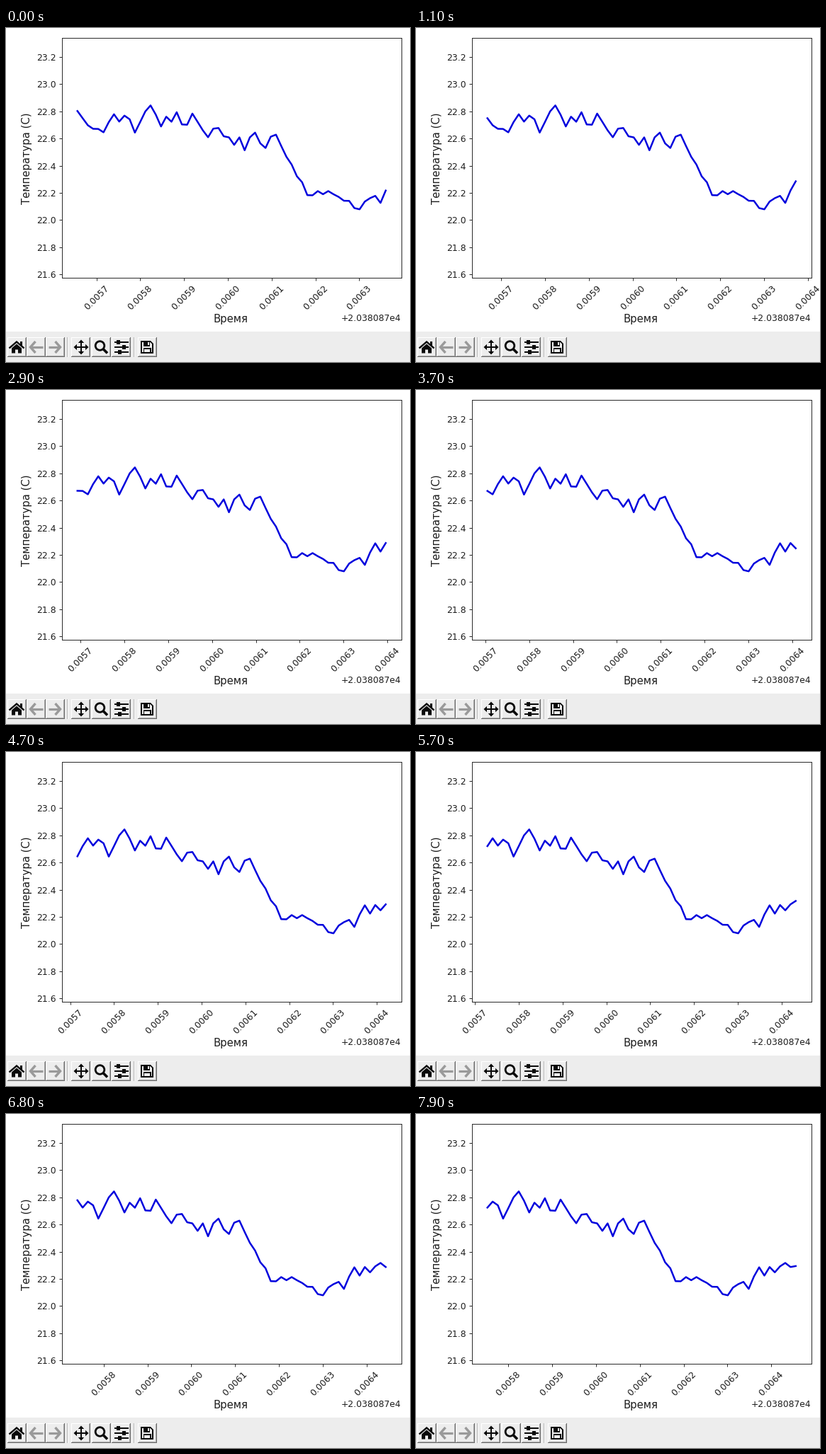
Animation, 570 px wide and 472 px high, one loop 8 s. Source, as a matplotlib script:

```python
import matplotlib.pyplot as plt
from matplotlib.animation import FuncAnimation
from matplotlib.patches import Circle, Polygon, Rectangle
from matplotlib.ticker import FuncFormatter, MultipleLocator

W, H, DPI = 570, 472, 100
PX = 72 / DPI          # one pixel in points
K = 570 / 640          # window scale
INK, EDGE, BLUE = "#1c1c1c", "#2a2a2a", "#0000dd"
ICON, DISABLED = "#0a0a0a", "#9a9a9a"

INTERVAL, FRAMES = 100, 80
ARRIVALS = (500, 1600, 2600, 3700, 4700, 5700, 6800, 7800)
WINDOW = 60                    # readings shown at once
START, STEP = 56.567, 0.1193   # time axis in units of 1e-4

# thousandths of a degree above 22
READINGS = [
    802, 749, 697, 671, 670, 645, 720, 778, 724, 768, 741, 643, 720, 799,
    843, 775, 688, 760, 723, 793, 703, 701, 783, 722, 660, 609, 672, 677,
    616, 608, 553, 608, 513, 608, 643, 564, 530, 613, 628, 545, 465, 408,
    322, 278, 183, 182, 213, 190, 213, 190, 170, 142, 141, 88, 79, 136,
    161, 178, 126, 217, 285, 224, 287, 248, 292, 317, 287, 294,
]
TEMPS = [22 + r / 1000 for r in READINGS]
TIMES = [START + STEP * i for i in range(len(TEMPS))]

plt.rcParams["font.family"] = "DejaVu Sans"
fig = plt.figure(figsize=(W / DPI, H / DPI), dpi=DPI, facecolor="white")

# Pixel-sized layer for the labels and the toolbar
ui = fig.add_axes([0, 0, 1, 1], zorder=-1)
ui.set(xlim=(0, W), ylim=(H, 0))
ui.axis("off")


def label(x, y, text, size, **kw):
    ui.text(x, y, text, fontsize=size * K, color=INK, va="baseline", **kw)


def stroke(points, color=ICON, width=1.0, join="miter"):
    xs, ys = zip(*points)
    ui.plot(xs, ys, color=color, lw=width * PX, solid_capstyle="butt",
            solid_joinstyle=join)


def fill(points, color=ICON):
    ui.add_patch(Polygon(points, closed=True, fc=color, ec="none"))


def box(x, y, w, h, color):
    ui.add_patch(Rectangle((x, y), w, h, fc=color, ec="none"))


def button(x, w=27, y=437, h=28):
    box(x, y, w, h, "#6c6c6c")
    box(x, y, w - 1, h - 1, "#ffffff")
    box(x + 1, y + 1, w - 2, h - 2, "#a8a8a8")
    box(x + 1, y + 1, w - 3, h - 3, "#ededed")


def home_icon(x, y):
    stroke([(x - 10.5, y + 1.5), (x, y - 7.5), (x + 10.5, y + 1.5)], width=2.4)
    box(x + 4.5, y - 8, 3, 6, ICON)
    fill([(x - 7, y + 1.5), (x, y - 4.5), (x + 7, y + 1.5), (x + 7, y + 8.5),
          (x + 2, y + 8.5), (x + 2, y + 3.5), (x - 2, y + 3.5),
          (x - 2, y + 8.5), (x - 7, y + 8.5)])


def arrow_icon(x, y, side):
    stroke([(x + side, y - 8), (x + 8 * side, y), (x + side, y + 8)],
           DISABLED, 3.4)
    stroke([(x + 7 * side, y), (x - 9 * side, y)], DISABLED, 3.2)


def pan_icon(x, y):
    box(x - 7, y - 1.3, 14, 2.6, ICON)
    box(x - 1.3, y - 7, 2.6, 14, ICON)
    for dx, dy in ((1, 0), (-1, 0), (0, 1), (0, -1)):
        fill([(x + 10.5 * dx, y + 10.5 * dy),
              (x + 6 * dx + 4.2 * dy, y + 6 * dy + 4.2 * dx),
              (x + 6 * dx - 4.2 * dy, y + 6 * dy - 4.2 * dx)])


def zoom_icon(x, y):
    ui.add_patch(Circle((x - 1.5, y - 2), 6.3, fc="none", ec=ICON,
                        lw=2.8 * PX))
    stroke([(x + 3, y + 2.5), (x + 9, y + 8.5)], width=3.6)


def sliders_icon(x, y):
    for dy, knob in ((-7, -3.8), (0, 4.2), (7, -2.2)):
        box(x - 10, y + dy - 0.9, 20, 1.8, ICON)
        box(x + knob - 2.6, y + dy - 2.6, 5.2, 5.2, ICON)


def save_icon(x, y):
    fill([(x - 9, y - 9), (x + 5, y - 9), (x + 9, y - 5), (x + 9, y + 9),
          (x - 9, y + 9)])
    fill([(x - 7, y - 7), (x + 4.5, y - 7), (x + 7, y - 4.5), (x + 7, y + 7),
          (x - 7, y + 7)], "#ededed")
    box(x - 5, y - 8, 9, 6.5, ICON)
    box(x + 0.6, y - 6.8, 2, 4, "#ededed")
    box(x - 5.5, y + 1, 11, 7, ICON)
    box(x - 3.8, y + 2.6, 7.6, 4.6, "#ededed")


def toolbar():
    box(0, 429, W, H - 429, "#ededed")
    for x in (2, 29, 56, 92, 121, 149, 186):
        button(x)
    for x in (86, 180):
        box(x, 437, 1, 28, "#b4b4b4")
        box(x + 1, 437, 1, 28, "#fafafa")
    home_icon(15, 451)
    arrow_icon(42.5, 451, -1)
    arrow_icon(68.5, 451, 1)
    pan_icon(106, 451)
    zoom_icon(134, 451)
    sliders_icon(162.5, 451)
    save_icon(199, 451)


def chart():
    left, right, top, bottom = 79, 557.5, 13.5, 352.5
    ax = fig.add_axes([left / W, 1 - bottom / H,
                       (right - left) / W, (bottom - top) / H])
    ax.set_ylim(21.578, 23.342)
    ax.yaxis.set_major_locator(MultipleLocator(0.2))
    ax.yaxis.set_major_formatter(FuncFormatter(lambda v, _: f"{v:.1f}"))
    ax.xaxis.set_major_locator(MultipleLocator(1))
    ax.xaxis.set_major_formatter(FuncFormatter(lambda v, _: f"{v / 1e4:.4f}"))
    ax.tick_params(labelsize=10 * K, length=3.5 * K, width=0.8 * K,
                   pad=3.5 * K, color=EDGE, labelcolor=INK)
    ax.tick_params(axis="x", rotation=45)
    for spine in ax.spines.values():
        spine.set(linewidth=0.8 * K, edgecolor=EDGE)
    return ax


toolbar()
label(317.5, 416, "Время", 12, ha="center")
label(557.5, 414, "+2.038087e4", 10, ha="right")
label(34, 184, "Температура (C)", 12, ha="center", rotation=90,
      rotation_mode="anchor")
ax = chart()
line, = ax.plot([], [], color=BLUE, lw=2 * K)


def update(frame):
    first = sum(frame * INTERVAL >= t for t in ARRIVALS)
    shown = slice(first, first + WINDOW)
    xs = TIMES[shown]
    margin = 0.05 * (xs[-1] - xs[0])
    line.set_data(xs, TEMPS[shown])
    ax.set_xlim(xs[0] - margin, xs[-1] + margin)
    return line,


anim = FuncAnimation(fig, update, frames=FRAMES, interval=INTERVAL,
                     init_func=lambda: update(0), repeat=True,
                     repeat_delay=0, blit=False)
plt.show()
```
